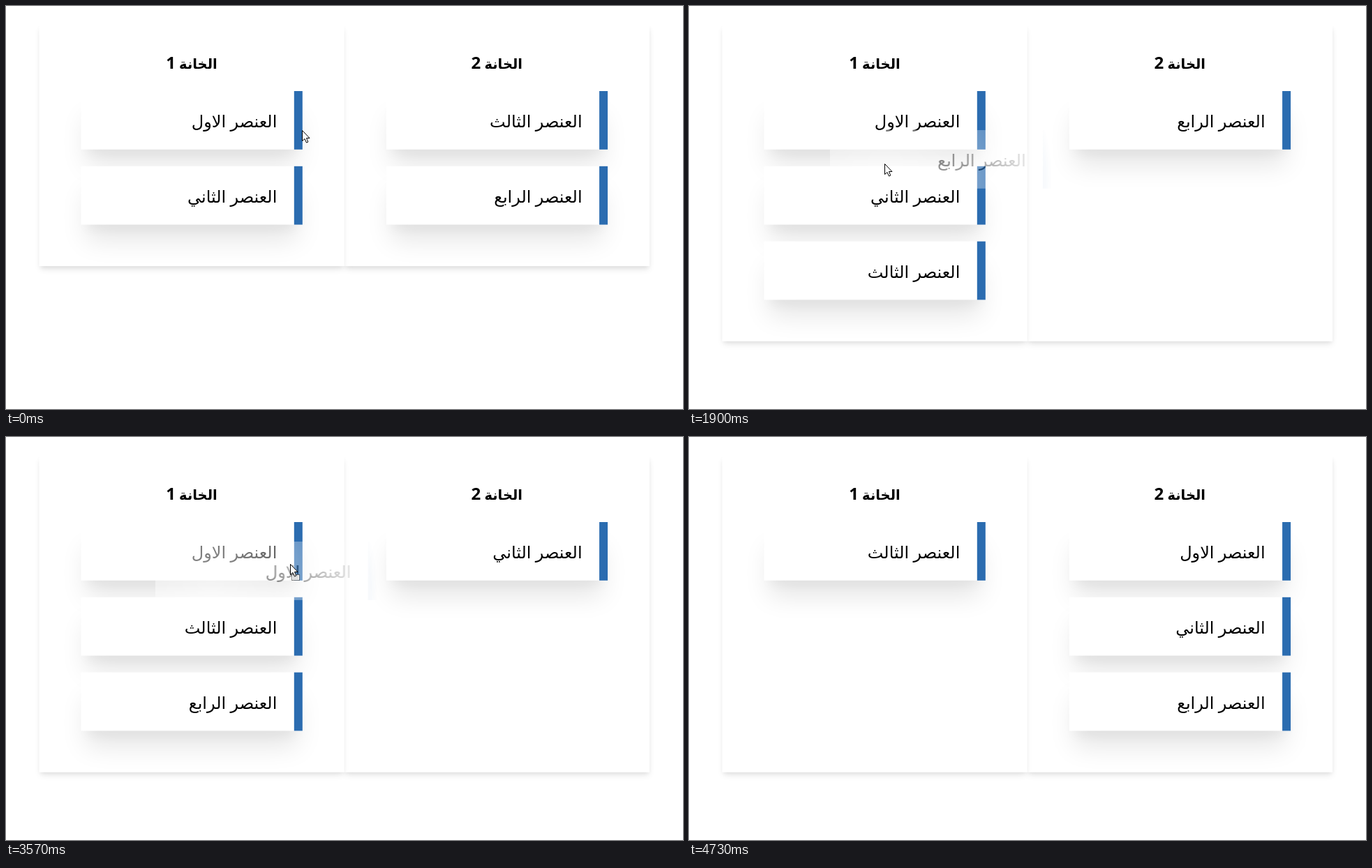
Recreate the animation shown at these times as an HTML page with a canvas. Size 970 by 578 pixels, loop 5310 ms.

```html
<!DOCTYPE html>
<html lang="ar">
<head>
<meta charset="utf-8">
<style>
  html, body { margin: 0; width: 100%; height: 100%; overflow: hidden; background: #fff; }
  canvas { display: block; width: 970px; height: 578px; }
</style>
</head>
<body>
<canvas id="stage" width="970" height="578"></canvas>
<script>
const ctx = document.getElementById('stage').getContext('2d');
const ghostCtx = document.createElement('canvas').getContext('2d');
ghostCtx.canvas.width = 320;
ghostCtx.canvas.height = 84;

const LOOP = 5310;
const SETTLE = 60; // pause between the end of a drag and its drop
const FONT = '"Open Sans", "DejaVu Sans", sans-serif';
const LABELS = ['الاول', 'الثاني', 'الثالث', 'الرابع'].map(n => 'العنصر ' + n);
const PANEL_TOP = 26, CARD_TOP = 122, CARD_H = 83.8, PITCH = 107.8, PAD = 60, BAR = 12;

// Pointer moves; those with an item drag it to the other column.
const START = { x: 424, y: 178 };
const MOVES = [
  { from: 30, to: 400, x: 622, y: 174 },
  { from: 400, to: 880, x: 300, y: 250, item: 2 },
  { from: 960, to: 1170, x: 656, y: 230 },
  { from: 1170, to: 1430, x: 623, y: 170 },
  { from: 1430, to: 1900, x: 280, y: 226, item: 3 },
  { from: 2170, to: 2630, x: 232, y: 281 },
  { from: 2800, to: 3130, x: 600, y: 240, item: 1 },
  { from: 3200, to: 3410, x: 301, y: 154 },
  { from: 3430, to: 3770, x: 584, y: 228, item: 0 },
  { from: 3840, to: 4040, x: 376, y: 264 },
  { from: 4070, to: 4330, x: 712, y: 300, item: 3 },
  { from: 4400, to: 4730, x: 80, y: 590 }
];
const DRAGS = MOVES.filter(m => m.item !== undefined);

function pointerAt(t) {
  let { x, y } = START;
  for (const move of MOVES) {
    const u = Math.max(0, Math.min(1, (t - move.from) / (move.to - move.from)));
    const eased = u * u * (3 - 2 * u);
    x += (move.x - x) * eased;
    y += (move.y - y) * eased;
  }
  return { x: Math.round(x), y: Math.round(y) };
}

function columnOf(item, t) {
  const drops = DRAGS.filter(d => d.item === item && d.to + SETTLE <= t).length;
  return ((item < 2 ? 0 : 1) + drops) % 2;
}

function layoutAt(t) {
  const columns = [[], []];
  LABELS.forEach((_, item) => columns[columnOf(item, t)].push(item));
  const rows = Math.max(...columns.map(c => c.length));
  // A page taller than the stage gets a scrollbar, which narrows the panels.
  const scrolls = rows > 3;
  const x0 = scrolls ? 42 : 47.5, w = scrolls ? 432.4 : 437.3;
  const panels = [0, 1].map(i => ({
    x: x0 + i * w, y: PANEL_TOP, w, h: 131.5 + PITCH * rows
  }));
  const cards = columns.flatMap((items, c) => items.map((item, row) => ({
    item, x: panels[c].x + PAD, y: CARD_TOP + row * PITCH, w: w - 2 * PAD
  })));
  return { panels, cards };
}

function boxShadow({ x, y, w, h }, dy, blur, spread, alpha) {
  const away = 3000; // only the shadow lands on the stage
  ctx.save();
  ctx.shadowColor = `rgba(0,0,0,${alpha})`;
  ctx.shadowBlur = blur;
  ctx.shadowOffsetX = away;
  ctx.shadowOffsetY = dy;
  ctx.fillRect(x - spread - away, y - spread, w + 2 * spread, h + 2 * spread);
  ctx.restore();
}

function write(c, text, x, y, font, align) {
  c.font = `${font} ${FONT}`;
  c.direction = 'rtl';
  c.textAlign = align;
  c.fillStyle = '#000';
  c.fillText(text, x, y);
}

function drawPanel(panel, index) {
  const { x, y, w, h } = panel;
  boxShadow(panel, 6, 9, -1.5, 0.1);
  boxShadow(panel, 3, 6, -1.5, 0.06);
  ctx.fillStyle = '#fff';
  ctx.fillRect(x, y, w, h);
  const mid = x + w / 2;
  write(ctx, 'الخانة', mid + 36.5, 90, 'bold 19.5px', 'right');
  write(ctx, String(index + 1), mid - 30, 90, 'bold 24px', 'center');
}

function drawFace(c, item, x, y, w) {
  c.fillStyle = '#fff';
  c.fillRect(x, y, w, CARD_H);
  c.fillStyle = '#2b6cb0';
  c.fillRect(x + w - BAR, y, BAR, CARD_H);
  write(c, LABELS[item], x + w - 36.5, y + 52, '24px', 'right');
}

function drawCard({ item, x, y, w }) {
  const box = { x, y, w, h: CARD_H };
  boxShadow(box, 30, 37.5, -7.5, 0.1);
  boxShadow(box, 15, 15, -7.5, 0.04);
  drawFace(ctx, item, x, y, w);
}

function drawGhost(drag, pointer, grab) {
  const card = layoutAt(drag.from).cards.find(c => c.item === drag.item);
  const g = ghostCtx;
  g.clearRect(0, 0, 320, 84);
  drawFace(g, card.item, 0, 0, card.w);
  const fade = g.createRadialGradient(80, 70, 0, 80, 70, 240);
  fade.addColorStop(0, 'rgba(0,0,0,0.6)');
  fade.addColorStop(0.55, 'rgba(0,0,0,0.35)');
  fade.addColorStop(1, 'rgba(0,0,0,0)');
  g.globalCompositeOperation = 'destination-in';
  g.fillStyle = fade;
  g.fillRect(0, 0, 320, 84);
  g.globalCompositeOperation = 'source-over';
  ctx.drawImage(g.canvas, card.x + pointer.x - grab.x, card.y + pointer.y - grab.y);
}

function drawBadge() {
  ctx.fillRect(2, 15, 11, 8);
  ctx.setLineDash([1, 1]);
  ctx.strokeRect(2, 15, 11, 8);
  ctx.beginPath();
  for (let row = 17; row < 23; row += 2) {
    ctx.moveTo(4, row);
    ctx.lineTo(12, row);
  }
  ctx.globalAlpha = 0.5;
  ctx.stroke();
  ctx.globalAlpha = 1;
  ctx.setLineDash([]);
}

function drawPointer({ x, y }, badge) {
  ctx.save();
  ctx.translate(x + 0.5, y + 0.5);
  ctx.strokeStyle = '#000';
  ctx.fillStyle = '#fff';
  if (badge) drawBadge();
  const arrow = new Path2D('M0 0V15L3.5 12L6 17.5L8.3 16.5L6 11H10.5Z');
  ctx.fill(arrow);
  ctx.stroke(arrow);
  ctx.restore();
}

function render(t) {
  const { panels, cards } = layoutAt(t);
  const pointer = pointerAt(t);
  const drag = DRAGS.find(d => t > d.from && t < d.to + SETTLE);
  ctx.fillStyle = '#fff';
  ctx.fillRect(0, 0, 970, 578);
  [1, 0].forEach(i => drawPanel(panels[i], i));
  cards.forEach(drawCard);
  let badge = false;
  if (drag) {
    const grab = pointerAt(drag.from);
    drawGhost(drag, pointer, grab);
    badge = pointer.x > grab.x;
  }
  drawPointer(pointer, badge);
}

const start = performance.now();
function tick() {
  render((performance.now() - start) % LOOP);
  requestAnimationFrame(tick);
}
tick();
</script>
</body>
</html>
```
